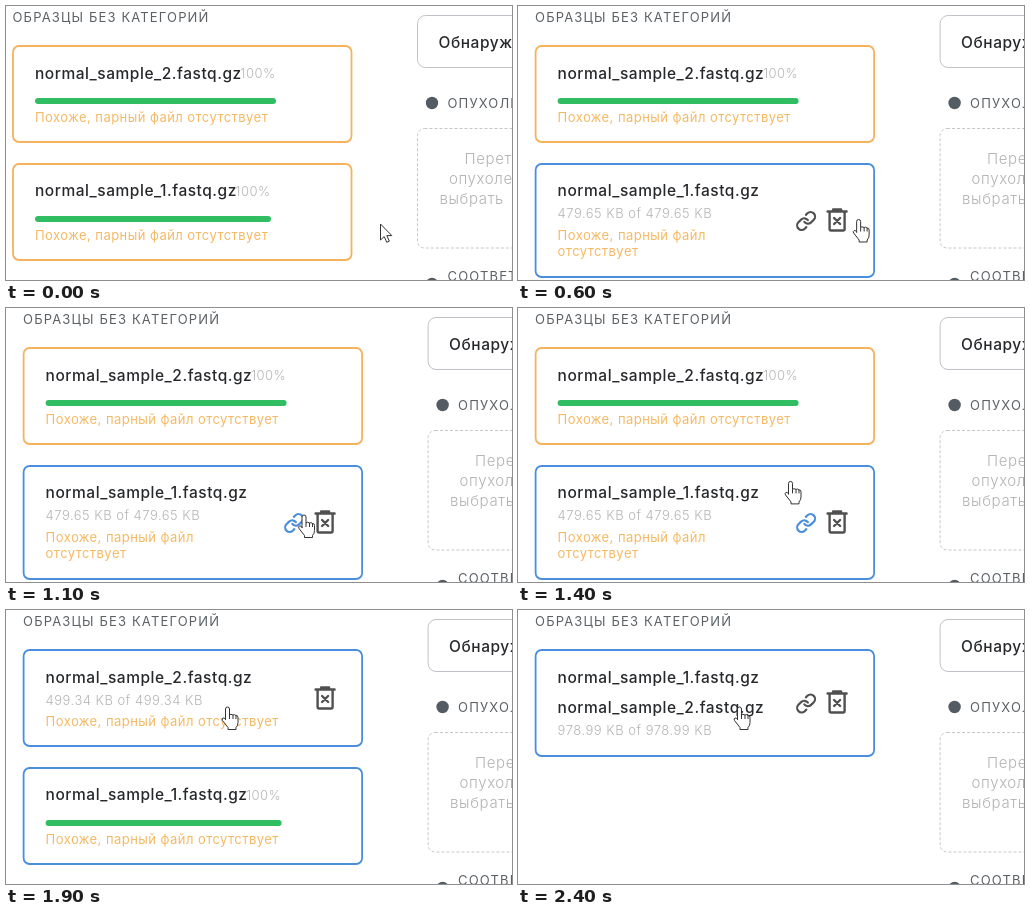
An HTML page for the animation above (2.5 s loop, 506 by 274 pixels).

```html
<!DOCTYPE html>
<html lang="ru">
<head>
<meta charset="utf-8">
<style>
html, body { margin: 0; width: 100%; height: 100%; overflow: hidden; background: #fff; }
svg { display: block; width: 506px; height: 274px; }
text { font-family: Inter, Roboto, sans-serif; white-space: pre; }
.head { font-size: 13px; letter-spacing: 1.15px; fill: #5c6166; }
.name { font-size: 15.5px; font-weight: 500; letter-spacing: .53px; fill: #26282b; }
.hint { font-size: 15px; font-weight: 300; letter-spacing: .6px; fill: #b2b2b2; }
.small { font-size: 13px; font-weight: 300; letter-spacing: .5px; fill: #b4b4b4; }
.warn { font-size: 13px; letter-spacing: .45px; fill: #f5b964; }
.tip { font-size: 15px; font-weight: 700; fill: #fff; }
.icon { fill: none; stroke-width: 2.4; stroke-linecap: round; stroke-linejoin: round; }
.pointer { fill: #fff; stroke: #333; stroke-linejoin: round; }
</style>
</head>
<body>
<svg id="stage" viewBox="0 0 506 274"></svg>
<script>
const LOOP = 2500, STEP = 100;
const ORANGE = '#f6b25e', BLUE = '#4b8fdc', DARK = '#505050';
const stage = document.getElementById('stage');

// Pointer tip: time, x, y
const route = [
  [0, 374.5, 218], [300, 374.5, 218], [500, 354.5, 216], [900, 299, 206],
  [1100, 298, 207], [1600, 255.5, 151], [1900, 221.5, 97], [LOOP, 221.5, 97]
];

function pointerAt(t) {
  const i = route.findIndex(p => p[0] > t);
  const [t0, x0, y0] = route[i - 1], [t1, x1, y1] = route[i];
  const k = (t - t0) / (t1 - t0);
  return [x0 + (x1 - x0) * k, y0 + (y1 - y0) * k];
}

const text = (cls, x, y, s) => `<text class="${cls}" x="${x}" y="${y}">${s}</text>`;
const at = (x, y, body) => `<g transform="translate(${x} ${y})">${body}</g>`;
const box = (y, h, color) =>
  `<rect x="7" y="${y}" width="338.5" height="${h}" rx="6" fill="#fff" stroke="${color}" stroke-width="1.8"/>`;

const link = (y, color) => at(277.5, y, `<path class="icon" stroke="${color}" transform="scale(.9) translate(-12 -12)"
  d="M10 13a5 5 0 0 0 7.54.54l3-3a5 5 0 0 0-7.07-7.07l-1.72 1.71M14 11a5 5 0 0 0-7.54-.54l-3 3a5 5 0 0 0 7.07 7.07l1.71-1.71"/>`);
const trash = y => at(308.5, y, `<path class="icon" stroke="${DARK}"
  d="M-9.5-8.5H9.5M-4-9V-10.5H4V-9M-7.5-8V9Q-7.5 10.5-6 10.5H6Q7.5 10.5 7.5 9V-8M-3-2L3 4M3-2L-3 4"/>`);

function card(n, y, color, open) {
  const tall = open && n === 1;
  const end = n === 1 ? 230.5 : 235.5;
  const top = Math.ceil(y);
  let s = box(top, tall ? 113 : 96, color) + text('name', 29, y + 33, `normal_sample_${n}.fastq.gz`);
  if (open) {
    const size = n === 1 ? '479.65 KB' : '499.34 KB';
    s += text('small', 29, y + 54.6, `${size} of ${size}`) + trash(y + (tall ? 56.6 : 48));
  } else {
    s += text('small', end - 1.2, y + 32.2, '100%') +
      `<path d="M32 ${top + 55}H${end + 31.5}" stroke="#31bd62" stroke-width="6" stroke-linecap="round"/>`;
  }
  const lines = tall ? ['Похоже, парный файл', 'отсутствует'] : ['Похоже, парный файл отсутствует'];
  return s + lines.map((l, i) => text('warn', 29, y + 76.2 + 16 * i, l)).join('');
}

const merged = () => box(40, 106, BLUE) +
  text('name', 29, 73, 'normal_sample_1.fastq.gz') +
  text('name', 29, 103, 'normal_sample_2.fastq.gz') +
  text('small', 29, 125, '978.99 KB of 978.99 KB') +
  link(93.5, DARK) + trash(92);

const page = text('head', 6.5, 16, 'ОБРАЗЦЫ БЕЗ КАТЕГОРИЙ') +
  '<rect x="411.5" y="9.5" width="200" height="52" rx="8" fill="none" stroke="#bfc3c7"/>' +
  text('name', 432.5, 42, 'Обнаружение') +
  '<g fill="#535c63"><circle cx="426" cy="97" r="6.2"/><circle cx="426" cy="278" r="6.2"/></g>' +
  text('head', 441.5, 102, 'ОПУХОЛЬ') + text('head', 441.5, 275, 'СООТВЕТСТВИЕ') +
  '<rect x="411.5" y="122.5" width="200" height="119.5" rx="7" fill="none" stroke="#c6c6c6" stroke-dasharray="3 2"/>' +
  text('hint', 458.5, 158, 'Перетащите') + text('hint', 443, 178, 'опухолевые') +
  text('hint', 433.5, 198, 'выбрать');

const tooltip = '<g opacity=".35"><rect x="70" y="139" width="360" height="46" rx="4" fill="#dfeaf0"/>' +
  text('tip', 84, 158, 'Выберите парный файл для объединения') + '</g>';

const arrow = '<path class="pointer" d="M0 0V16L3.7 12.6L6.3 18.3L8.8 17.2L6.3 11.6H11.3Z"/>';
const hand = `<path class="pointer" d="M-2 13V2a2 2 0 0 1 4 0v6q1-1.5 3.5 0q1.5-1 3 .5q2-.3 2 2v5q0 3-2 5v2h-8v-2l-5.5-7q-1-2 .5-2.5t2.5 1.5z
  M2 8v4M5.5 8v4M8.5 8.5v3.5"/>`;

function draw(t) {
  const [x, y] = pointerAt(t);
  const hover1 = t >= 600, hover2 = t >= 1700, joined = t >= 2200;
  let cards;
  if (joined) cards = merged();
  else {
    cards = card(2, 40, hover2 ? BLUE : ORANGE, hover2) +
      card(1, 157.4, hover1 ? BLUE : ORANGE, hover1 && !hover2);
    if (hover1 && !hover2) cards += link(215, t < 800 ? DARK : BLUE);
  }
  const inside = hover1 && (y > 157 || y < 137);
  stage.innerHTML = at(hover1 ? 10.6 : 0, 0, page + cards) +
    (t === 800 || t === 900 ? tooltip : '') + at(x, y, inside ? hand : arrow);
}

let last = -1;
function tick() {
  const t = Math.floor(performance.now() % LOOP / STEP) * STEP;
  if (t !== last) draw(last = t);
  requestAnimationFrame(tick);
}
tick();
</script>
</body>
</html>
```
